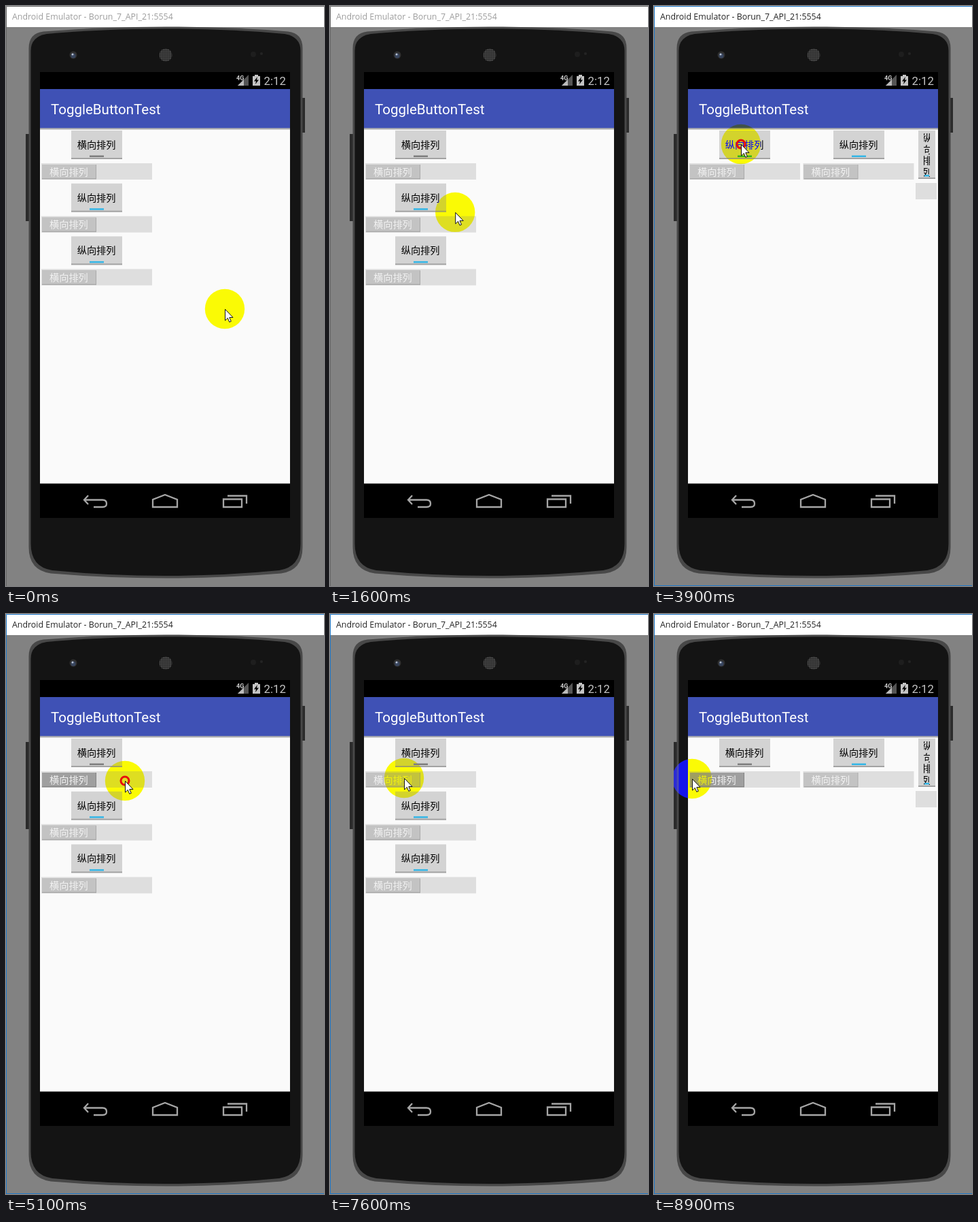
Animation of 468x852 px, one loop 9000 ms. Source, as an HTML page:

```html
<!DOCTYPE html>
<html lang="zh">
<head>
<meta charset="utf-8">
<title>ToggleButtonTest</title>
<style>
html, body { margin: 0; width: 100%; height: 100%; overflow: hidden; background: #828282 }
svg { display: block; isolation: isolate }
text { font-family: Roboto, sans-serif; white-space: pre }
.cjk { font: 14.2px "Noto Sans CJK SC", "Noto Sans CJK", sans-serif }
.nav { fill: none; stroke: #a6a6a6; stroke-width: 2.3 }
</style>
</head>
<body>
<svg width="468" height="852" viewBox="0 0 468 852">
  <defs>
    <linearGradient id="shade" x2="0" y2="1">
      <stop stop-color="#888"/><stop offset="1" stop-color="#fafafa"/>
    </linearGradient>
    <pattern id="mesh" width="3" height="3" patternUnits="userSpaceOnUse">
      <rect width="3" height="3" fill="#222"/><circle cx="1.5" cy="1.5" r="1" fill="#666"/>
    </pattern>
    <clipPath id="slit"><rect x="397" y="183" width="9" height="71"/></clipPath>
  </defs>

  <rect width="468" height="852" fill="#828282"/>
  <rect width="468" height="31" fill="#fff"/>
  <text id="caption" x="9" y="20" style="font:12.4px 'Open Sans',sans-serif">Android Emulator - Borun_7_API_21:5554</text>
  <path id="edge" d="M.5 852V.5H468" fill="none"/>
  <path id="base" d="M0 851.5H468" stroke="#1f78c8"/>

  <!-- phone: rim, then face -->
  <path d="M29 188h5v128h-5zM435 135h5v51h-5z" fill="#2b2b2b"/>
  <path d="M33.500 62Q33.500 40 55 37.500Q140 30.500 235 30.500Q330 30.500 415 37.500Q436.500 40 436.500 62V795Q436.500 829 405 833.500Q320 840.500 235 840.500Q150 840.500 66 833.500Q33.500 829 33.500 795Z" fill="#484848"/>
  <path d="M36.500 66Q36.500 45 60 41Q140 33.500 235 33.500Q330 33.500 410 41Q433.500 45 433.500 66V790Q433.500 824 402 829Q320 837 235 837Q150 837 68 829Q36.500 824 36.500 790Z" fill="#141414"/>
  <circle cx="99" cy="72" r="5.500" fill="#303030"/>
  <circle cx="99" cy="73" r="3.500" fill="#39465f"/>
  <circle cx="98" cy="71" r="1.500" fill="#b9c4d6"/>
  <circle cx="235" cy="72" r="9.500" fill="url(#mesh)"/>
  <circle cx="364" cy="71" r="4" fill="#1e1e1e"/>
  <circle cx="376" cy="70" r="2" fill="#242424"/>

  <!-- screen -->
  <rect x="50" y="97" width="368" height="655"/>
  <rect x="50" y="122" width="368" height="579.500" fill="#fafafa"/>
  <rect x="50" y="122" width="368" height="57.500" fill="#3f51b5"/>
  <rect x="50" y="179.500" width="368" height="3" fill="url(#shade)"/>
  <text x="66" y="159" font-size="20.500" fill="#fff">ToggleButtonTest</text>
  <text x="339" y="109" font-size="9" font-weight="700" fill="#ccc">4G</text>
  <path d="M341 117L357 101V117Z" fill="#555"/>
  <path d="M341 117L350 108V117Z" fill="#bbb"/>
  <path d="M363 103h3v-2h5v2h3v14h-11z" fill="#c4c4c4"/>
  <path d="M370 104L365 110.500H368L367 115L372 108.500H369Z"/>
  <text x="379.500" y="116" font-size="16.800" fill="#c4c4c4">2:12</text>
  <path class="nav" d="M121 719L115 725.500L121 732M115 725.500H142Q148 725.500 148 731Q148 736 142 736H129"/>
  <path class="nav" d="M216 736V725L234 718L252 725V736Z"/>
  <path class="nav" d="M320 724.500H347V736H320ZM326 719.500H354V731"/>

  <g id="app"></g>

  <circle id="halo" r="29.200" fill="#00f" style="mix-blend-mode:difference"/>
  <g id="mouse">
    <circle id="ring" r="6" fill="none" stroke="#e80c0c" stroke-width="3"/>
    <path d="M.5 .5V17L4.300 13.400L6.800 19.300L9.300 18.200L6.800 12.500H12Z" fill="#fff" stroke="#111"/>
  </g>
</svg>

<script>
const $ = id => document.getElementById(id);
const ACROSS = '横向排列', DOWN = '纵向排列', BLUE = '#33b5e5';
const TRAVEL = 82, ROW = 77.7;

// Where the hand turns or rests: [ms, x, y]
const stops = [
  [0, 322, 445], [600, 157, 194], [900, 216, 260], [1300, 233, 371], [2000, 109, 198],
  [2400, 128, 203], [4100, 128, 203], [4800, 77, 245], [5100, 175, 245], [6000, 243, 303],
  [6500, 187, 241], [7000, 61, 243], [7600, 109, 241], [8500, 201, 243], [8900, 56, 242]
];
// Mouse releases: first on the button, then on the switch. Each one turns the layout.
const buttonUps = [2800, 4100], switchUps = [5400, 6800, 8200, 8900];
const ups = [...buttonUps, ...switchUps];

function ease(f) {
  f = Math.max(0, Math.min(1, f));
  return f * f * (3 - 2 * f);
}

function cursor(t) {
  const i = Math.max(1, stops.findIndex(s => s[0] >= t));
  const [t0, x0, y0] = stops[i - 1], [t1, x1, y1] = stops[i];
  const f = ease((t - t0) / (t1 - t0));
  return [x0 + (x1 - x0) * f, y0 + (y1 - y0) * f];
}

// The thumb crosses during the last 300 ms of each press, in alternating directions.
const thumb = t => switchUps.reduce((dx, up, i) => dx + (i % 2 ? -1 : 1) * TRAVEL * ease((t - up) / 300 + 1), 0);

const rect = (x, y, w, h, fill) => `<rect x="${x}" y="${y}" width="${w}" height="${h}" fill="${fill}"/>`;
const label = (x, y, s, fill) => `<text class="cjk" x="${x}" y="${y}" fill="${fill}">${s}</text>`;
const plate = (x, y, w, h) => rect(x, y + 1, w, h, '#a2a2a2') + rect(x, y, w, h - 1, '#d3d3d3');

function toggle(x, y, on) {
  return plate(x, y, 75, 41) + label(x + 8.7, y + 26, on ? DOWN : ACROSS, '#000') +
    rect(x + 27, y + 36.5, 21, 2.5, on ? BLUE : '#7d7d7d');
}

function slider(x, y, dx = 0, held = false) {
  const on = dx > TRAVEL / 2, tx = x + 1 + dx;
  return rect(x, y, 163, 24, '#dedede') +
    rect(tx, y + 2, 80, 21.5, on ? '#2787ad' : held ? '#858585' : '#aaa') +
    rect(tx, y + 2, 79, 20, on ? '#33a3d3' : held ? '#9f9f9f' : '#c3c3c3') +
    label(tx + 11, y + 17.5, on ? DOWN : ACROSS, '#f2f2f2');
}

// The third pair is squeezed into a sliver at the right edge.
function sliver() {
  const chars = [...DOWN].map((c, i) => label(394.5, 199 + i * 16.5, c, '#000')).join('');
  return plate(389, 183, 25, 70) +
    `<g clip-path="url(#slit)">${chars}${rect(398, 248, 7, 2.5, BLUE)}</g>` +
    rect(385, 260, 31, 24, '#dedede');
}

function draw(t) {
  const [x, y] = cursor(t), active = t >= 2500;
  const down = ups.some(up => t > up - 400 && t < up);
  const held = switchUps.some(up => t > up - 400 && t <= up);
  const turns = ups.filter(up => t > up).length;

  let app = toggle(96, 183, turns === 1) + slider(52, 231, thumb(t), held);
  if (turns % 2) app += toggle(264, 183, true) + slider(219.5, 231) + sliver();
  else for (const i of [1, 2]) app += toggle(96, 183 + i * ROW, true) + slider(52, 231 + i * ROW);
  $('app').innerHTML = app;

  $('caption').setAttribute('fill', active ? '#222' : '#9c9c9c');
  $('edge').setAttribute('stroke', active ? '#1f78c8' : '#666');
  $('base').setAttribute('opacity', +active);
  for (const id of ['halo', 'mouse']) $(id).setAttribute('transform', `translate(${x} ${y})`);
  $('ring').setAttribute('opacity', +down);
}

let last = -1;
function tick() {
  const t = Math.floor(performance.now() % 9000 / 100) * 100;
  if (t !== last) draw(last = t);
  requestAnimationFrame(tick);
}
tick();
</script>
</body>
</html>
```
